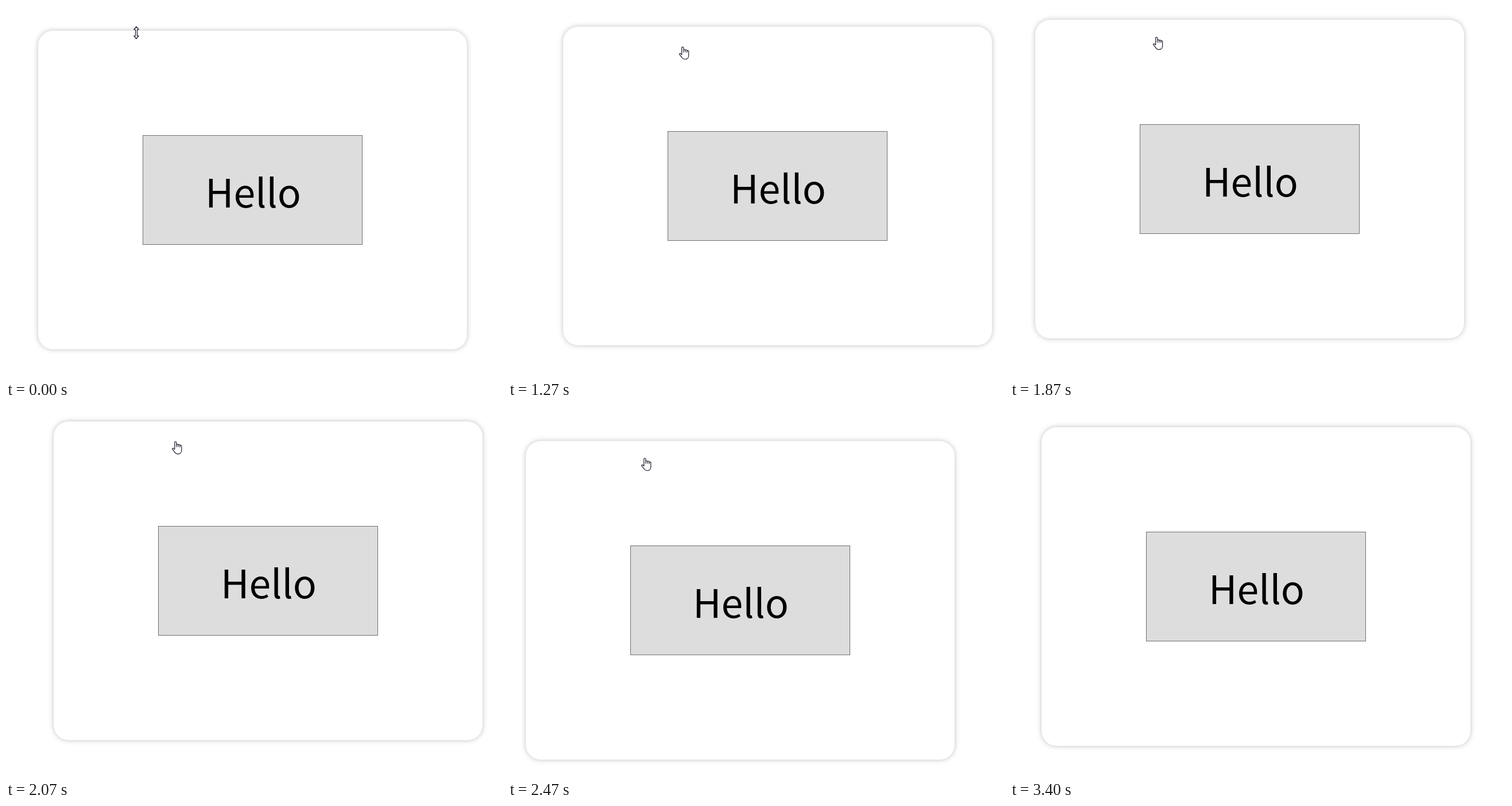
Recreate the animation shown at these times as an HTML page with a canvas. Size 864 by 648 pixels, loop 3.87 s.

```html
<!DOCTYPE html>
<html lang="en">
<head>
<meta charset="utf-8">
<title>Dragging a window</title>
<style>
  html, body { margin: 0; overflow: hidden; background: #fff; }
  canvas { display: block; }
</style>
</head>
<body>
<canvas id="stage" width="864" height="648"></canvas>
<script>
const ctx = document.getElementById('stage').getContext('2d');
const LOOP = 3870, FPS = 15;

// Window corner while it is dragged: [step, x, y]
const drag = [
  [13, 56, 43], [14, 52, 38], [15, 50, 25], [16, 68, 14], [17, 87, 16], [18, 100, 26],
  [19, 96, 36], [21, 87, 58], [22, 72, 62], [24, 45, 55], [26, 32, 39], [28, 44, 24],
  [29, 54, 17], [31, 83, 27], [32, 91, 40], [34, 79, 61], [35, 66, 66], [36, 46, 66],
  [37, 31, 61], [38, 28, 50], [40, 42, 38], [41, 55, 37]
];
const GRIP = [209, 32];

const hand = new Path2D('M4.7 14V2.2a1.6 1.6 0 0 1 3.2 0V9.5V6.5a1.5 1.5 0 0 1 3 0V9.5V7' +
  'a1.5 1.5 0 0 1 3 0V10V8.2a1.4 1.4 0 0 1 2.8 0V15.5c0 4-2.5 6.5-6 6.5-3 0-4.5-1-6-3.5' +
  'L.8 13.8c-.8-1.5 1-2.5 2-1.5L4.7 14Z');
const resize = new Path2D('M0-10.5L4.2-5.5H1.5V5.5H4.2L0 10.5L-4.2 5.5H-1.5V-5.5H-4.2Z');

const clamp = (v, lo, hi) => Math.min(hi, Math.max(lo, v));
const smooth = u => u * u * (3 - 2 * u);
const mix = (a, b, u) => a.map((v, i) => v + (b[i] - v) * u);

// Smooth curve through the drag points
function windowAt(step) {
  const last = drag.length - 1;
  step = clamp(step, drag[0][0], drag[last][0]);
  const i = clamp(drag.findIndex(p => p[0] > step) - 1, 0, last - 1);
  const n = step === drag[last][0] ? last - 1 : i;
  const a = drag[n], b = drag[n + 1], span = b[0] - a[0], u = (step - a[0]) / span;
  const slope = (j, axis) => {
    const p = drag[Math.max(j - 1, 0)], q = drag[Math.min(j + 1, last)];
    return (q[axis] - p[axis]) / (q[0] - p[0]) * span;
  };
  return [1, 2].map(axis =>
    a[axis] + (b[axis] - a[axis]) * smooth(u) +
    slope(n, axis) * u * (1 - u) ** 2 - slope(n + 1, axis) * u * u * (1 - u));
}

// The pointer leads the window by a quarter step
function pointerAt(step) {
  const [x, y] = windowAt(step > 13 ? step + 0.25 : step);
  const grip = [x + GRIP[0], y + GRIP[1]];
  if (step < 9) return mix([227, 46.5], grip, smooth(step / 9));
  if (step > 43) return mix(grip, [125.5, 610], smooth((step - 43) / 7));
  return grip;
}

function drawWindow(x, y) {
  ctx.save();
  ctx.translate(Math.round(x), Math.round(y));
  ctx.shadowColor = 'rgba(0, 0, 0, .25)';
  ctx.shadowBlur = 10;
  ctx.fillStyle = '#fff';
  ctx.beginPath();
  ctx.roundRect(0, 0, 747, 555, 26);
  ctx.fill();
  ctx.shadowColor = 'transparent';
  ctx.fillStyle = '#ddd';
  ctx.strokeStyle = '#707070';
  ctx.lineWidth = 1;
  ctx.fillRect(182, 182, 383, 191);
  ctx.strokeRect(182.5, 182.5, 382, 190);
  ctx.fillStyle = '#000';
  ctx.font = '500 68px "Noto Sans CJK SC", "Noto Sans CJK JP", "Noto Sans CJK", sans-serif';
  ctx.fillText('Hello', 291, 308);
  ctx.restore();
}

function drawPointer(x, y) {
  const resizing = y < 51;
  ctx.save();
  ctx.translate(resizing ? x : x - 6, y);
  ctx.fillStyle = '#fff';
  ctx.strokeStyle = '#1c1c2c';
  ctx.lineWidth = 1.2;
  ctx.lineJoin = 'round';
  const shape = resizing ? resize : hand;
  ctx.fill(shape);
  ctx.stroke(shape);
  ctx.restore();
}

function draw(now) {
  const step = Math.floor((now % LOOP + 4) * FPS / 1000);
  ctx.clearRect(0, 0, 864, 648);
  drawWindow(...windowAt(step));
  if (step < 51) drawPointer(...pointerAt(step));
  requestAnimationFrame(draw);
}
requestAnimationFrame(draw);
</script>
</body>
</html>
```
